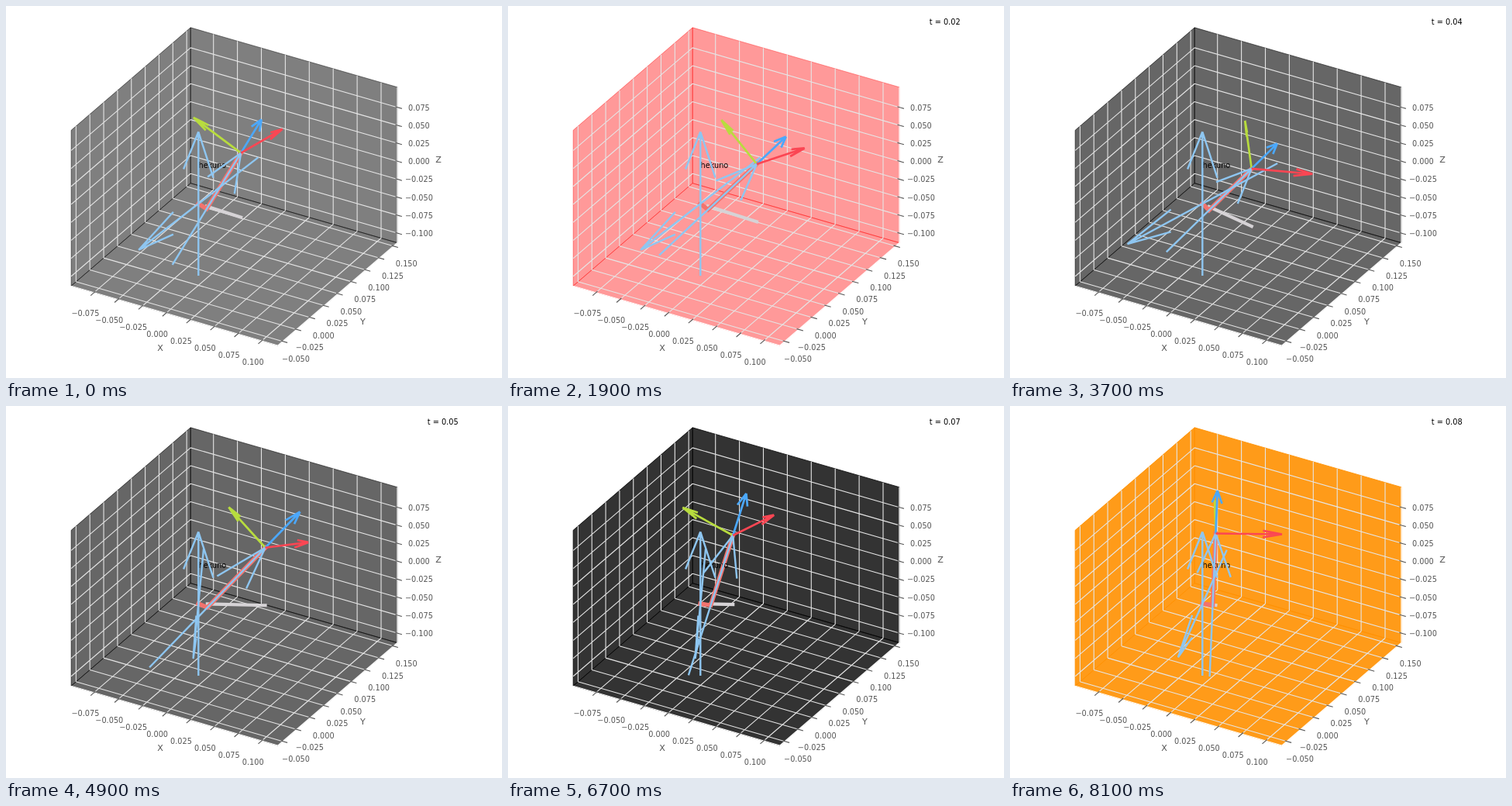
Animation, 640 px wide and 480 px high, one loop 8200 ms. Source, as an HTML page:

```html
<!DOCTYPE html>
<html lang="en">
<head>
<meta charset="utf-8">
<title>Arm pose in 3D axes</title>
<style>
html, body { margin: 0; width: 100%; height: 100%; overflow: hidden; background: #fff; }
svg { display: block; width: 640px; height: 480px; }
text { font-family: "DejaVu Sans", sans-serif; font-size: 9.72px; }
.tick { fill: #555; text-anchor: middle; }
.name { fill: #555; text-anchor: middle; font-size: 11.1px; }
path { fill: none; }
</style>
</head>
<body>
<svg id="stage" viewBox="0 0 640 480"></svg>
<script>
const STEP = 100, STEPS = 82;
const RAD = Math.PI / 180;
const stage = document.getElementById('stage');

function add(tag, attrs, text) {
  const el = document.createElementNS('http://www.w3.org/2000/svg', tag);
  for (const k in attrs) el.setAttribute(k, attrs[k]);
  if (text !== undefined) el.textContent = text;
  stage.appendChild(el);
  return el;
}

// Orthographic view: metres to pixels
const ORIGIN = [248.3, 255.1];
const project = ([x, y, z]) => [
  ORIGIN[0] + 1236 * x + 714 * y,
  ORIGIN[1] + 356 * x - 614.3 * y - 928 * z
];
const fmt = p => p[0].toFixed(2) + ' ' + p[1].toFixed(2);
const seg = (a, b) => 'M' + fmt(project(a)) + 'L' + fmt(project(b));
const scale = (v, k) => v.map(c => c * k);
const sum = (a, b) => a.map((c, i) => c + b[i]);
const cross = (a, b) => [
  a[1] * b[2] - a[2] * b[1],
  a[2] * b[0] - a[0] * b[2],
  a[0] * b[1] - a[1] * b[0]
];

const X0 = -0.0989, X1 = 0.1169, Y0 = -0.0587, Y1 = 0.157, Z0 = -0.1134, Z1 = 0.1030;
const ticks = (from, n) => Array.from({ length: n }, (_, i) => from + i * 0.025);
const xs = ticks(-0.075, 8), ys = ticks(-0.05, 9), zs = ticks(-0.1, 8);

// Panes
const panes = [
  [[X0, Y0, Z0], [X0, Y1, Z0], [X0, Y1, Z1], [X0, Y0, Z1]],
  [[X0, Y1, Z0], [X1, Y1, Z0], [X1, Y1, Z1], [X0, Y1, Z1]],
  [[X0, Y0, Z0], [X1, Y0, Z0], [X1, Y1, Z0], [X0, Y1, Z0]]
].map(c => add('polygon', { points: c.map(p => fmt(project(p))).join(' '), 'stroke-width': 1 }));

// Grid and axis lines
let grid = '';
for (const x of xs) grid += seg([x, Y0, Z0], [x, Y1, Z0]) + seg([x, Y1, Z0], [x, Y1, Z1]);
for (const y of ys) grid += seg([X1, y, Z0], [X0, y, Z0]) + seg([X0, y, Z0], [X0, y, Z1]);
for (const z of zs) grid += seg([X0, Y0, z], [X0, Y1, z]) + seg([X0, Y1, z], [X1, Y1, z]);
add('path', { d: grid, stroke: '#e5e5e5', 'stroke-width': 1.1 });
add('path', {
  d: seg([X0, Y0, Z0], [X1, Y0, Z0]) + seg([X1, Y0, Z0], [X1, Y1, Z0]) + seg([X1, Y1, Z0], [X1, Y1, Z1]),
  stroke: '#fff', 'stroke-width': 1.1
});

// Ticks with labels
let marks = '';
function tick(p, value, dir, shift) {
  const [x, y] = project(p);
  const at = k => fmt([x + dir[0] * k, y + dir[1] * k]);
  marks += 'M' + at(-0.4) + 'L' + at(1);
  const label = (value < -0.001 ? '\u2212' : '') + Math.abs(value).toFixed(3);
  add('text', { class: 'tick', x: x + shift[0], y: y + shift[1] }, label);
}
xs.forEach(x => tick([x, Y0, Z0], x, [-4.5, 3.9], [-11.3, 30.6]));
ys.forEach(y => tick([X1, y, Z0], y, [6, 1.7], [16.9, 26.6]));
zs.forEach(z => tick([X1, Y1, z], z, [6, 1.7], [28, 3.9]));
add('path', { d: marks, stroke: '#555', 'stroke-width': 1.1 });
add('text', { class: 'name', x: 199, y: 445 }, 'X');
add('text', { class: 'name', x: 460.5, y: 410.5 }, 'Y');
add('text', { class: 'name', x: 558, y: 202 }, 'Z');

// Moving parts, back to front
const line = (stroke, width, cap = 'butt') =>
  add('path', { stroke, 'stroke-width': width, 'stroke-linecap': cap });
const shadow = line('#d6d3d6', 4.2, 'square');
const link = line('#f2736e', 5.6, 'square');
add('text', { x: 248.5, y: 209 }, 'hekuno');
const SKY = '#8ec6f1';
const yawAxis = line(SKY, 2.4), baseAxis = line(SKY, 2.4);
const greenArrow = line('#b8dc3e', 2.7);
const armAxis = line(SKY, 2.4);
const blueArrow = line('#4ba8fc', 2.7);
const redArrow = line('#fb4653', 2.7);
const clock = add('text', { x: 543.8, y: 24 });

// Shaft plus two barbs at 15 degrees
function arrow(tail, v) {
  const tip = sum(tail, v);
  const n = Math.hypot(v[0], v[1]);
  const side = cross(n < 1e-9 ? [0, 1, 0] : [v[1] / n, -v[0] / n, 0], v);
  let d = seg(tail, tip);
  for (const s of [-1, 1]) {
    const back = sum(scale(v, Math.cos(15 * RAD)), scale(side, s * Math.sin(15 * RAD)));
    d += seg(tip, sum(tip, scale(back, -0.3)));
  }
  return d;
}
const centred = (mid, dir) => arrow(sum(mid, scale(dir, -0.1)), scale(dir, 0.2));

// step, yaw, tilt and roll in 10 degree notches, light level in tenths
const poses = [
  [0, 0, 2, 8, 5],
  [11, -2, 3, 5, 4],
  [19, 0, 3, 7, 4],
  [37, -1, 3, 5, 6],
  [49, 3, 3, 4, 6],
  [67, 3, 1, 5, 8],
  [81, 2, 0, 1, 9]
];
const lights = [[0, '0,0,0'], [6, '0,255,255'], [15, '255,0,0'], [28, '0,0,0'], [74, '255,145,0']];

function poseAt(step) {
  let i = 0;
  while (i < poses.length - 2 && poses[i + 1][0] <= step) i++;
  const a = poses[i], b = poses[i + 1];
  const k = (step - a[0]) / (b[0] - a[0]);
  return a.slice(1).map((v, j) => Math.round(v + (b[j + 1] - v) * k));
}

function draw(step) {
  const [yawN, tiltN, rollN, level] = poseAt(step);
  const yaw = (-2.7 + 10 * yawN) * RAD;
  const tilt = (1.6 + 10 * tiltN) * RAD;
  const roll = (3.5 + 10 * rollN) * RAD;

  const cy = Math.cos(yaw), sy = Math.sin(yaw), ct = Math.cos(tilt), st = Math.sin(tilt);
  const across = [-sy, cy, 0];
  const forward = [cy * ct, sy * ct, -st];
  const up = [cy * st, sy * st, ct];
  const base = [0, 0, 0];
  const elbow = scale(forward, 0.0095);
  const head = sum(elbow, scale(up, 0.1));
  const turn = a => scale(sum(scale(forward, Math.cos(a)), scale(across, Math.sin(a))), 0.06);
  const set = (el, d) => el.setAttribute('d', d);

  set(shadow, seg([elbow[0], elbow[1], 0], [head[0], head[1], 0]));
  set(link, 'M' + [base, elbow, head].map(p => fmt(project(p))).join('L'));
  set(baseAxis, centred(base, [0, 0, 1]));
  set(yawAxis, centred(base, scale(across, -1)));
  set(armAxis, centred(elbow, up));
  set(redArrow, arrow(head, turn(roll)));
  set(greenArrow, arrow(head, turn(roll + Math.PI / 2)));
  set(blueArrow, arrow(head, scale(up, 0.06)));

  const rgb = lights.filter(l => l[0] <= step).pop()[1];
  const color = `rgba(${rgb},${level / 10})`;
  for (const p of panes) {
    p.setAttribute('fill', color);
    p.setAttribute('stroke', color);
  }
  clock.textContent = step ? 't = ' + (Math.round(step / 10) / 100).toFixed(2) : '';
}

let start = null, shown = -1;
function tickFrame(now) {
  if (start === null) start = now;
  const step = Math.floor(Math.max(0, now - start) / STEP) % STEPS;
  if (step !== shown) draw(shown = step);
  requestAnimationFrame(tickFrame);
}
draw(shown = 0);
requestAnimationFrame(tickFrame);
</script>
</body>
</html>
```
